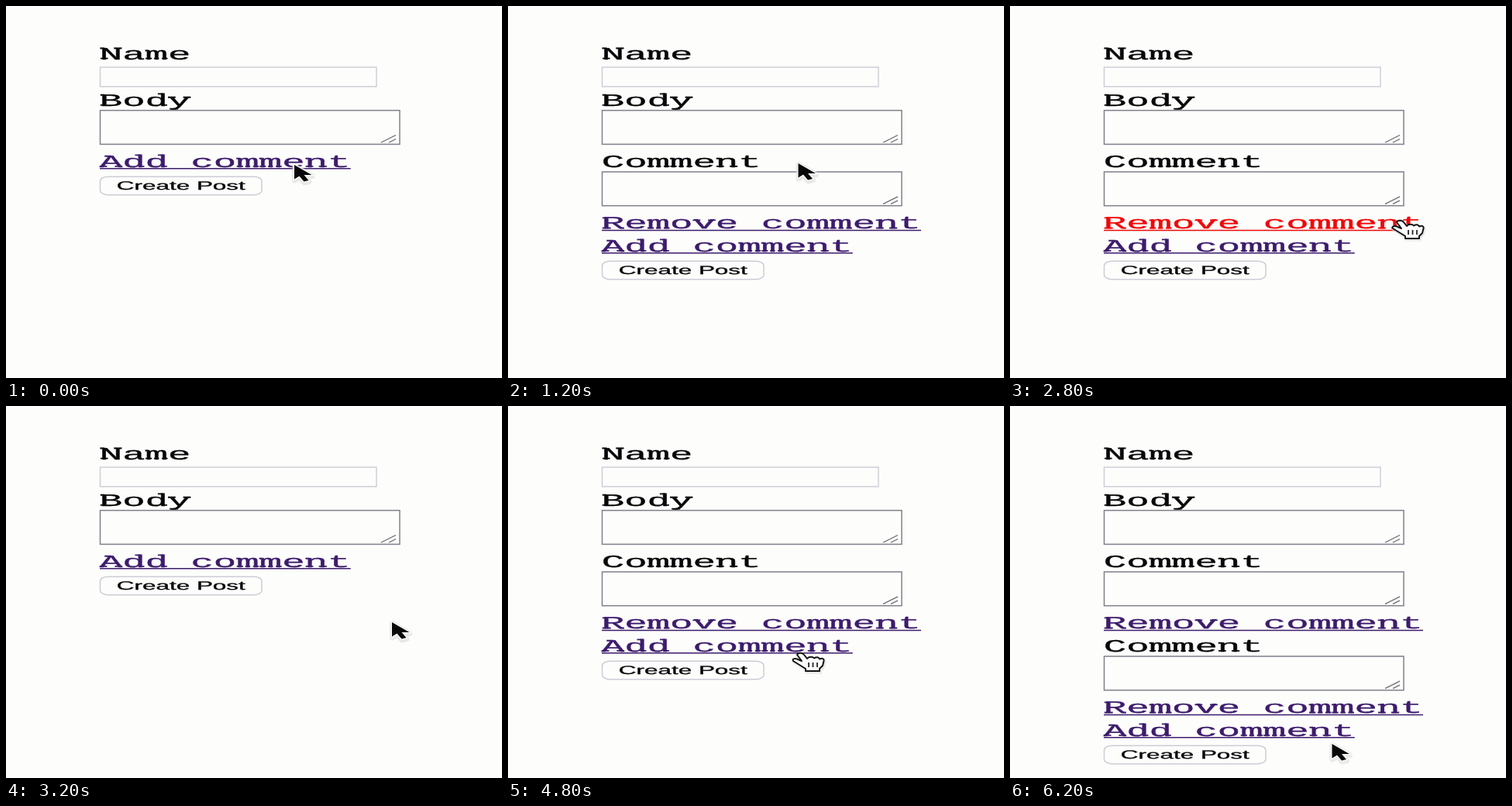
An HTML page that plays this animation: 640x480 px, repeating every 7200 ms.

```html
<!DOCTYPE html>
<html lang="en">
<head>
<meta charset="utf-8">
<title>Nested comment form</title>
<style>
  html, body { margin: 0; width: 100%; height: 100%; overflow: hidden; background: #fdfdfc; }
  svg { display: block; width: 100%; height: 100%; }
  text { white-space: pre; text-rendering: geometricPrecision; stroke-width: .3; }
  .mono { font: 22.5px "Liberation Mono", "Courier New", monospace; }
  .sans { font: 15.5px "Liberation Sans", Arial, sans-serif; }
  .field, .line, .serif { fill: none; stroke-width: 1.5; }
  .serif { stroke-width: 1.9; }
</style>
</head>
<body>
<svg id="stage" viewBox="0 0 640 480"></svg>
<script>
const LOOP = 7200;
const BLOCK = 109; // height of one comment block
const CELL = 13.5; // width of one letter before widening
const WIDE = 2.18;
const INK = '#08080a', LINK = '#3d1c6c', ACTIVE = '#f00808';
const stage = document.getElementById('stage');

// Slab serifs that turn the plain monospace into a typewriter face.
const serifs = {
  A: 'M0 -.9H4.5M9 -.9H13.5M3 -14H7',
  B: 'M.5 -14H3M.5 -.9H3',
  N: 'M.3 -14H3M.6 -.9H5M8.5 -14H13.2',
  R: 'M.5 -14H3M.5 -.9H5.5M11 -.9H13.4',
  d: 'M7.5 -15.4H10.7M10.7 -.9H13',
  m: 'M0 -11H2M.2 -.9H4M5.2 -.9H8.2M9.8 -.9H13.3',
  n: 'M.4 -11H2.6M.5 -.9H5M8.3 -.9H13',
  v: 'M0 -11H4.5M9 -11H13.5',
  y: 'M0 -11H4.5M9 -11H13.5M1 3.8H6'
};

// The whole page is drawn about twice as wide as high.
const write = (s, x, y, color, cls, wide, extra = '') =>
  `<g transform="translate(${x} ${y}) scale(${wide} 1)" stroke="${color}">` +
  `<text class="${cls}" fill="${color}">${s}</text>${extra}</g>`;

function label(s, y, color = INK) {
  const slabs = [...s].map((c, i) => serifs[c] ?
    `<path class="serif" d="${serifs[c]}" transform="translate(${i * CELL} 0)"/>` : '');
  return write(s, 120.7, y, color, 'mono', WIDE, slabs.join(''));
}

const link = (s, y, color) => label(s, y, color) +
  `<path class="line" stroke="${color}" d="M121 ${y + 2}h${s.length * CELL * WIDE}"/>`;

const box = (y, w, h, color, r = 0) =>
  `<rect class="field" x="121.5" y="${y}" width="${w}" height="${h}" rx="${r}" ry="${r * 0.6}" stroke="${color}"/>`;

const area = y => box(y, 386.5, 43.7, '#80808a') +
  `<path class="line" stroke="#808086" stroke-width="1.2" d="M484 ${y + 41.5}l19 -9.5M494 ${y + 41.5}l9 -4.5"/>`;

const button = y => box(y, 208.5, 23.5, '#cdcdd6', 10) +
  write('Create Post', 142.7, y + 16.7, INK, 'sans', 2.03);

const ARROW = 'M0 0V18.5L6.5 14.5L12.5 21.5L18.5 20L12.5 13H22.5Z';
const HAND = 'M-5 2C-4 -1 2 -1 4 2L8 7C10 4 15 4 17 6.5C20 4.5 23 5 24 7.5' +
  'C28 6 30 7 29.5 10L28 16L24 20V23H6V20L-2 15L-10 10C-12 7 -7 6 -4 8L1 10Z';

const pointers = {
  arrow: `<path d="${ARROW}" transform="translate(.5 1.5)" fill="#dcdcdc" stroke="#dcdcdc" stroke-width="7" stroke-linejoin="round" opacity=".6"/>
    <path d="${ARROW}" fill="#080808" stroke="#fdfdfd" stroke-width="2.4" paint-order="stroke"/>`,
  hand: `<path d="${HAND}" transform="translate(1 1.5)" fill="none" stroke="#dcdcdc" stroke-width="4" opacity=".6"/>
    <path d="${HAND}" fill="#fdfdfd" stroke="#141414" stroke-width="2" stroke-linejoin="round"/>
    <path d="M10 12v6M15.5 12v6M21 12v6" stroke="#252525" stroke-width="1.8"/>`,
  beam: `<path d="M-9 -10H-5Q0 -10 0 -6V6Q0 10 -5 10H-9M9 -10H5Q0 -10 0 -6M0 6Q0 10 5 10H9M-5 2H5"
    fill="none" stroke="#434343" stroke-width="2.2"/>`
};

// [start ms, comments, pointer, x, y, pressed link]
const poses = [
  [0, 0, 'arrow', 372, 205],
  [200, 0, 'hand', 380, 204],
  [400, 0, 'hand', 381, 202],
  [600, 0, 'hand', 381, 201],
  [800, 0, 'hand', 382, 201],
  [1200, 1, 'arrow', 374.5, 203],
  [1400, 1, 'beam', 390, 228],
  [1600, 1, 'beam', 420, 240],
  [2200, 1, 'beam', 472, 316],
  [2400, 1, 'hand', 492, 292],
  [2600, 1, 'hand', 502, 279],
  [2800, 1, 'hand', 504, 277, 'remove'],
  [3200, 0, 'arrow', 498, 279],
  [3400, 0, 'arrow', 470, 258],
  [3600, 0, 'arrow', 418, 222],
  [3800, 0, 'hand', 384, 202],
  [4000, 0, 'hand', 382, 202, 'add'],
  [4200, 1, 'arrow', 374.5, 203],
  [4400, 1, 'beam', 377, 238],
  [4600, 1, 'hand', 378, 286],
  [4800, 1, 'hand', 378, 319],
  [5000, 1, 'hand', 378, 312],
  [5200, 1, 'hand', 378, 311, 'add'],
  [5400, 2, 'arrow', 372, 313],
  [5600, 2, 'beam', 391, 356],
  [5800, 2, 'arrow', 413, 434],
  [6200, 2, 'arrow', 415.5, 436]
];

function page(comments, pressed) {
  let s = label('Name', 68.5) + box(79, 356.5, 25, '#cfcfd8') +
    label('Body', 128.8) + area(134.7);
  for (let i = 0; i < comments; i++) {
    const y = 207.8 + i * BLOCK;
    s += label('Comment', y) + area(y + 6.2) +
      link('Remove comment', y + 79.6, pressed === 'remove' ? ACTIVE : LINK);
  }
  const end = 207.8 + comments * BLOCK;
  return s + link('Add comment', end, pressed === 'add' ? ACTIVE : LINK) + button(end + 12.4);
}

let shown;
function draw(t) {
  const pose = poses.findLast(p => p[0] <= t);
  if (pose === shown) return;
  shown = pose;
  const [, comments, kind, x, y, pressed] = pose;
  stage.innerHTML = page(comments, pressed) +
    `<g transform="translate(${x} ${y})">${pointers[kind]}</g>`;
}

const start = performance.now();
function tick() {
  draw((performance.now() - start) % LOOP);
  requestAnimationFrame(tick);
}
tick();
</script>
</body>
</html>
```
